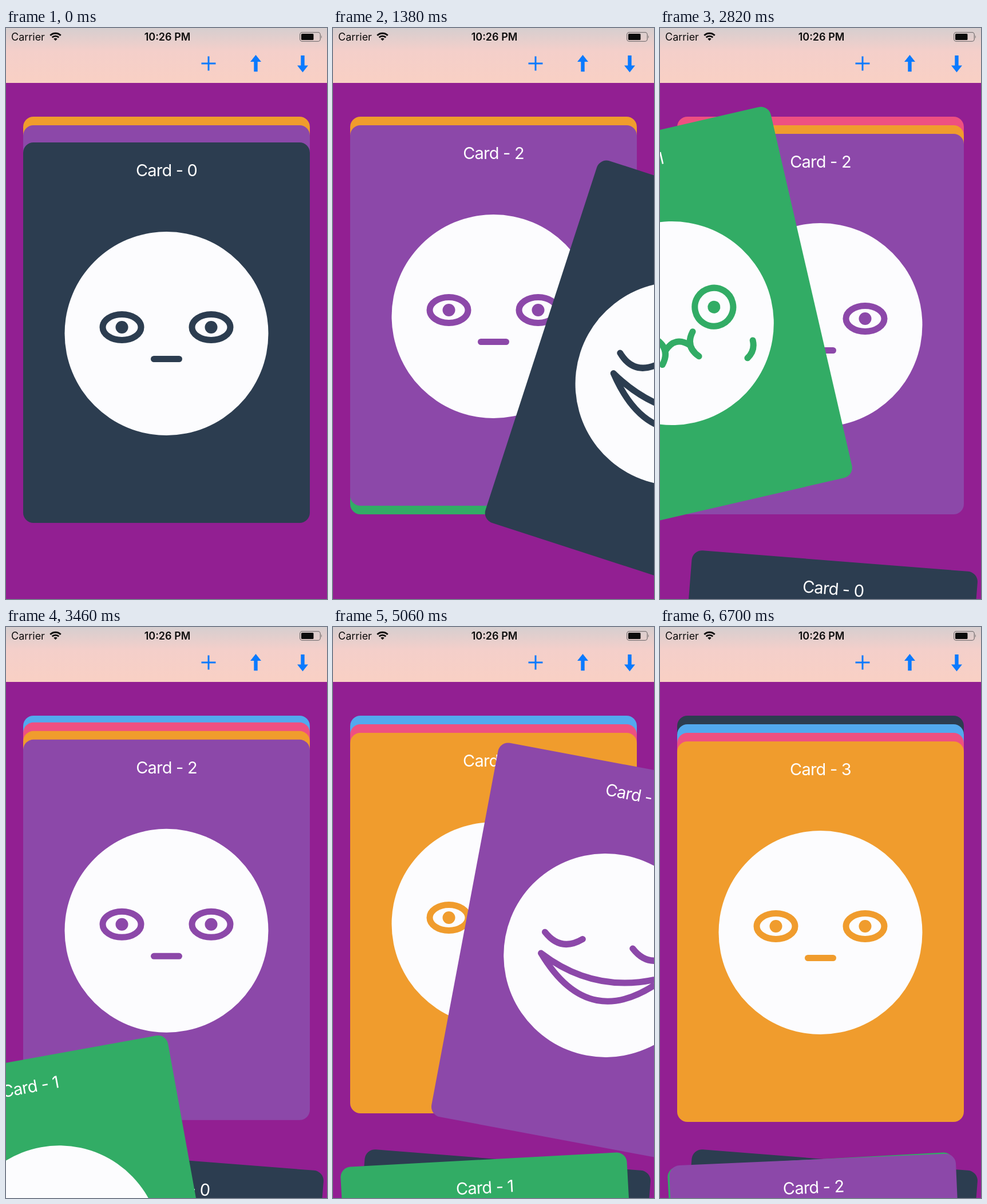
Write an HTML page that moves like this. It is 561 px wide and 998 px high and loops after 8000 ms.

```html
<!DOCTYPE html>
<html lang="en">
<head>
<meta charset="utf-8">
<title>Card deck</title>
<style>
  html, body { margin: 0; width: 100%; height: 100%; overflow: hidden; background: #921f92; }
  svg { display: block; width: 100%; height: 100%; }
  text { font-family: Inter, Roboto, sans-serif; }
  .title { font-size: 29px; letter-spacing: -.8px; fill: #fff; text-anchor: middle; }
  .status { font-size: 18px; fill: #0b0b0b; }
  .clock { font-weight: 600; text-anchor: middle; }
  .face { fill: none; stroke: var(--c); stroke-width: 11; stroke-linecap: round; stroke-linejoin: round; display: none; }
  .face .pupil { fill: var(--c); stroke: none; }
  .calm > .calm, .happy > .happy, .sick > .sick { display: inline; }
</style>
</head>
<body>
<svg viewBox="0 0 561 998">
  <defs>
    <linearGradient id="bar" x2="0" y2="1">
      <stop offset="0" stop-color="#d6cecf"/>
      <stop offset=".42" stop-color="#f4cfca"/>
      <stop offset="1" stop-color="#f9d0c4"/>
    </linearGradient>
  </defs>
  <rect width="561" height="998" fill="#921f92"/>
  <g id="deck"></g>
  <rect width="561" height="96" fill="url(#bar)"/>
  <text class="status" x="9" y="22">Carrier</text>
  <text class="status clock" x="282" y="22">10:26 PM</text>
  <g transform="translate(86.5 22.3)" fill="none" stroke="#0b0b0b" stroke-width="2.9">
    <path d="M-9.2-9.2A13 13 0 0 1 9.2-9.2M-5.8-5.8A8.2 8.2 0 0 1 5.8-5.8"/>
    <path d="M0 0L-3.2-3.2A4.5 4.5 0 0 1 3.2-3.2Z" fill="#0b0b0b" stroke="none"/>
  </g>
  <rect x="513.7" y="7.7" width="35.6" height="15.6" rx="4" fill="none" stroke="#7d7677" stroke-width="1.3"/>
  <rect x="516" y="10" width="21.5" height="11" rx="1.5" fill="#0b0b0b"/>
  <path d="M550.8 12.5Q553 15.5 550.8 18.5Z" fill="#7d7677"/>
  <g fill="#0a7aff">
    <path d="M341.5 60.5h11v-11h3v11h11v3h-11v11h-3v-11h-11z"/>
    <path id="arrow" d="M436.5 47L446 59H439.7V76.3H433.3V59H427Z"/>
    <use href="#arrow" transform="rotate(180 477.5 62.2)"/>
  </g>
</svg>
<script>
const LOOP = 8000, MID_X = 280.5, MID_Y = 532.5, PILE_Y = 1263;
const COLORS = ['#2c3d50', '#32ac65', '#8c48a9', '#f09c2d', '#ee5081', '#52a9ee', '#2c3d50'];

// Drag keys: time, dx, dy, angle. The last key is the release pose.
const THROWS = [
  { at: 1500, time: 360, tilt: 4.5,
    keys: [[460, 0, 0, 0], [940, 180, 33, 9.9], [1150, 180, 33, 9.9], [1380, 321.5, 88, 18]] },
  { at: 3260, time: 500, tilt: -3.1,
    keys: [[2340, 0, 0, 0], [2820, -260, -18, -13], [3070, -260, -18, -13], [3260, -291, -18, -14.2]] },
  { at: 6140, time: 550, tilt: -2.5,
    keys: [[4460, 0, 0, 0], [5220, 221, 45, 12], [5310, 221, 45, 12], [5500, -140, 25, -7.6],
           [5840, -140, 25, -7.6], [6060, -158.5, 22, -8.55]] }
];

const clamp = p => Math.min(1, Math.max(0, p));
const smooth = p => p * p * (3 - 2 * p);
const easeOut = (p, k) => 1 - (1 - p) ** k;
const mix = (a, b, p) => a + (b - a) * p;

const eyes = ry => [-78, 78].map(x =>
  `<ellipse cx="${x}" cy="-11" rx="33.5" ry="${ry}"/><circle class="pupil" cx="${x}" cy="-11" r="11"/>`).join('');
const SMILE = 'M-111.5-20.5Q-78 9-44.5-20.5M44.5-20.5Q78 9 111.5-20.5' +
  'M-111.5 17Q0 73 111.5 17Q0 143-111.5 17Z';
const QUEASY = 'M-32 22.5Q-13 45-32.5 67M32 22.5Q13 45 33 67M-22.5 45Q0 22 22.5 45' +
  'M-131 61Q-131 80-115 89M131 61Q131 80 115 89';

const deck = document.getElementById('deck');
const cards = COLORS.map((color, i) => {
  const g = document.createElementNS('http://www.w3.org/2000/svg', 'g');
  g.style.setProperty('--c', color);
  g.innerHTML = `
    <rect x="-250.5" y="-332.5" width="501" height="665" rx="18" fill="${color}"/>
    <text class="title" y="-273.5">Card - ${i}</text>
    <g class="mood" transform="translate(0 1.5)">
      <circle r="178" fill="#fcfcfe"/>
      <g class="face calm">${eyes(22.5)}<path d="M-22 44.5H22"/></g>
      <g class="face happy"><path d="${SMILE}"/></g>
      <g class="face sick">${eyes(33.5)}<path d="${QUEASY}"/></g>
    </g>`;
  return { g, mood: g.querySelector('.mood') };
});

function dragPose(keys, t) {
  let n = 0;
  while (n < keys.length - 1 && t >= keys[n + 1][0]) n++;
  const a = keys[n], b = keys[n + 1] || a;
  const p = a === b ? 0 : smooth((t - a[0]) / (b[0] - a[0]));
  return [1, 2, 3].map(j => mix(a[j], b[j], p));
}

function place(i, x, y, angle) {
  const { g, mood } = cards[i];
  g.setAttribute('transform', `translate(${MID_X + x} ${y}) rotate(${angle})`);
  mood.setAttribute('class', 'mood ' + (x > 20 ? 'happy' : x < -20 ? 'sick' : 'calm'));
}

let lastGone = -1;
function stack(gone) {
  if (gone === lastGone) return;
  lastGone = gone;
  // The second and third cards start out swapped in depth.
  const order = gone ? [6, 5, 4, 3, 2, 1, 0].filter(i => i >= gone) : [6, 5, 4, 3, 1, 2, 0];
  for (let i = 0; i < gone; i++) order.push(i);
  order.forEach(i => {
    cards[i].g.style.display = i - gone > 3 ? 'none' : '';
    deck.append(cards[i].g);
  });
}

function draw(t) {
  let shift = 0;
  for (const { at, time } of THROWS) shift += easeOut(clamp((t - at) / time), 3);
  stack(THROWS.filter(o => t >= o.at).length);

  cards.forEach((card, i) => {
    const home = MID_Y - Math.min(45, Math.max(0, 15 * (i - shift)));
    const toss = THROWS[i];
    if (!toss || t < toss.keys[0][0]) return place(i, 0, home, 0);
    const [x, y, angle] = dragPose(toss.keys, t);
    const p = clamp((t - toss.at) / toss.time), s = smooth(p);
    place(i, mix(x, 0, s), mix(MID_Y + y, PILE_Y, easeOut(p, 2.77)), mix(angle, toss.tilt, s));
  });
}

const start = performance.now();
function tick() {
  draw((performance.now() - start) % LOOP);
  requestAnimationFrame(tick);
}
tick();
</script>
</body>
</html>
```
